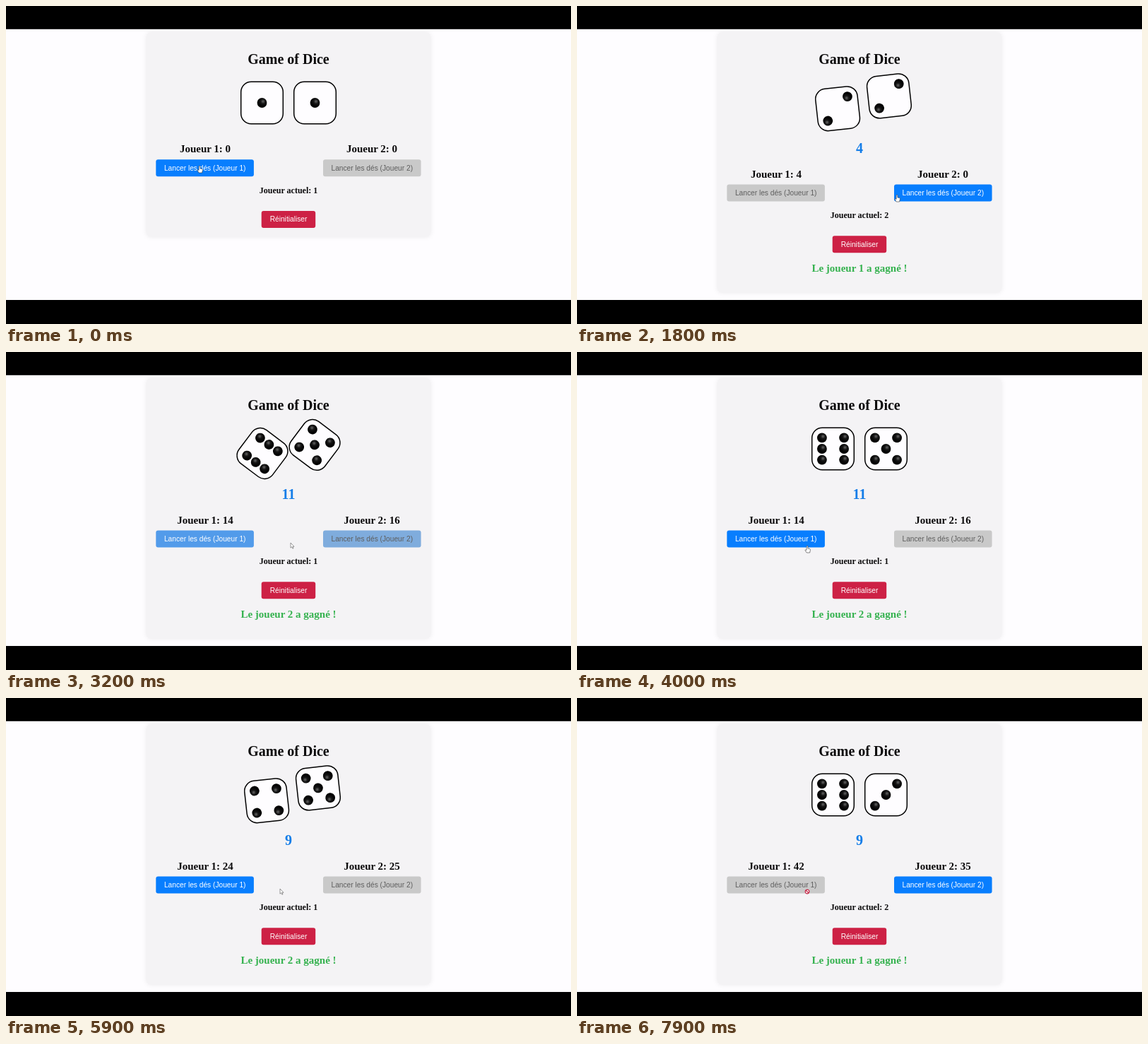
Animation, 800 px wide and 450 px high, one loop 8 s. Source, as an HTML page:

```html
<!DOCTYPE html>
<html lang="fr">
<head>
<meta charset="utf-8">
<title>Game of Dice</title>
<style>
  html, body { margin: 0; width: 100%; height: 100%; overflow: hidden; background: #000; }
  svg { display: block; width: 100%; height: 100%; }
  text { text-anchor: middle; font: bold 15px "Liberation Serif", "Times New Roman", serif; fill: #0b0a0b; }
  .big { font-size: 20px; }
  .turn { font-size: 12px; }
  .label { font: 10.2px "Liberation Sans", Arial, sans-serif; fill: #fff; }
  .panel { fill: #f4f3f5; filter: drop-shadow(0 0 3px rgba(0, 0, 0, .07)); }
  .face { fill: #fefdff; stroke: #000; stroke-width: 1.5; }
</style>
</head>
<body>
<svg viewBox="0 0 800 450">
  <defs>
    <radialGradient id="shine" cx=".6" cy=".36" r=".5">
      <stop offset="0" stop-color="#666"/>
      <stop offset=".45" stop-color="#161616"/>
      <stop offset="1" stop-color="#000"/>
    </radialGradient>
  </defs>
  <rect y="32.8" width="800" height="383.2" fill="#fefdff"/>
  <rect id="panel" class="panel" x="198.5" y="37" width="403" rx="7"/>
  <text class="big" x="400" y="82">Game of Dice</text>
  <text id="sum" class="big" x="400" y="208" style="fill:#147de8"></text>
  <g id="lower">
    <text id="score0" x="282" y="207.4"></text>
    <text id="score1" x="518" y="207.4"></text>
    <rect id="button0" x="212.3" y="217.2" width="138.6" height="24" rx="3"/>
    <rect id="button1" x="449" y="217.2" width="138.6" height="24" rx="3"/>
    <text id="label0" class="label" x="281.7" y="232.5">Lancer les dés (Joueur 1)</text>
    <text id="label1" class="label" x="518.3" y="232.5">Lancer les dés (Joueur 2)</text>
    <text id="turn" class="turn" x="400" y="264.7"></text>
    <rect x="361.7" y="290" width="76.5" height="24" rx="3" fill="#cd2145"/>
    <text class="label" x="400" y="305.3">Réinitialiser</text>
  </g>
  <text id="winner" x="400" y="376" style="fill:#35b24f"></text>
  <g id="dice">
    <g id="die0"></g>
    <g id="die1"></g>
  </g>
  <g id="cursor">
    <path id="arrow" d="M0 0V7.2L1.7 5.7L2.9 8.2L4 7.7L2.9 5.3H5Z" fill="#fff" stroke="#555" stroke-width=".6"/>
    <path id="hand" d="M-.9 .8Q0 -.6 .9 .8V4L3.7 4.6Q4.6 5 4.4 6.2L3.6 10H-.8L-3 6.6Q-3.2 5.2-.9 6.4Z" fill="#fff" stroke="#333" stroke-width=".6"/>
    <g id="blocked" fill="#fff" stroke="#c52848" stroke-width="1.2">
      <circle r="2.8"/><path d="M-2-2L2 2"/>
    </g>
  </g>
</svg>
<script>
const LOOP = 8000, FRAME = 100;
const ROLL = 195, UPDATE = 152, FADE = 100, GLIDE = 265;
const SHIFT = 35.3;
const BLUE = [8, 126, 254], GREY = [201, 201, 201];
const PIVOT = 402.8, DIE_X = [362.5, 437.5];
const ENTRY = [274, 226], HOMES = [[322, 274], [507, 264]];

// Players alternate; each pair of digits is one throw.
const throws = "22 32 46 65 64 54 63 55 63".split(" ").map(pair => [...pair].map(Number));
const starts = [310, 1710, 2428, 3010, 4510, 5210, 5810, 6402, 7410];

const el = id => document.getElementById(id);
const show = (id, on) => el(id).setAttribute("display", on ? "inline" : "none");
const move = (id, x, y, turn = 0) =>
  el(id).setAttribute("transform", `translate(${x} ${y}) rotate(${turn})`);
const mix = (a, b, k) => a + (b - a) * k;

function pips(n) {
  const spots = n % 2 ? [[0, 0]] : [];
  if (n > 1) spots.push([1, -1], [-1, 1]);
  if (n > 3) spots.push([-1, -1], [1, 1]);
  if (n === 6) spots.push([-1, 0], [1, 0]);
  return spots;
}

function drawDie(id, n) {
  if (el(id).dataset.n === String(n)) return;
  el(id).dataset.n = n;
  el(id).innerHTML = '<rect class="face" x="-29.8" y="-29.8" width="59.6" height="59.6" rx="14.5"/>' +
    pips(n).map(([x, y]) =>
      `<circle cx="${x * 15.6}" cy="${y * 15.6}" r="6.9" fill="url(#shine)"/>`).join("");
}

// After each throw the pointer glides towards the next player's button.
function cursorAt(t) {
  let pos = ENTRY;
  for (let i = 0; i < starts.length - 1 && t > starts[i]; i++) {
    const k = 1 - Math.exp((starts[i] - Math.min(t, starts[i + 1])) / GLIDE);
    const goal = HOMES[(i + 1) % 2];
    pos = pos.map((v, axis) => mix(v, goal[axis], k));
  }
  return pos.map(Math.round);
}

function drawCursor(t, shift, active) {
  const [x, y] = cursorAt(t);
  const inRow = y > 217 + shift && y < 241.2 + shift;
  const over = inRow && x > 212 && x < 351 ? 0 : inRow && x > 449 && x < 588 ? 1 : -1;
  move("cursor", x, y);
  show("arrow", over < 0);
  show("hand", over === active);
  show("blocked", over >= 0 && over !== active);
}

function drawRoll(t) {
  const start = starts.find(s => t >= s && t < s + ROLL);
  const k = start ? (t - start) / ROLL : 0;
  move("dice", PIVOT, 137, 360 * k);
  DIE_X.forEach((x, i) => move("die" + i, x - PIVOT, 0, 360 * k ** 5));
}

function draw(t) {
  const count = starts.filter(s => t >= s + UPDATE).length;
  const active = count % 2;
  const shift = count ? SHIFT : 0;
  const faces = count ? throws[count - 1] : [1, 1];
  const scores = [0, 0];
  throws.slice(0, count).forEach(([a, b], i) => scores[i % 2] += a + b);

  el("panel").setAttribute("height", count ? 369 : 290);
  move("lower", 0, shift);
  el("sum").textContent = count ? faces[0] + faces[1] : "";
  el("turn").textContent = `Joueur actuel: ${active + 1}`;
  el("winner").textContent = count ? `Le joueur ${2 - active} a gagné !` : "";

  const x = count ? Math.min(1, (t - starts[count - 1] - UPDATE) / FADE) : 1;
  const fade = 1 - (1 - x) ** 2;
  for (const p of [0, 1]) {
    const on = p === active;
    const blue = on ? fade : 1 - fade;
    el("score" + p).textContent = `Joueur ${p + 1}: ${scores[p]}`;
    el("button" + p).setAttribute("fill", `rgb(${GREY.map((g, i) => Math.round(mix(g, BLUE[i], blue)))})`);
    el("label" + p).style.fill = on ? "#fff" : "#5e5e5e";
    drawDie("die" + p, faces[p]);
  }

  drawRoll(t);
  drawCursor(t, shift, active);
}

const begin = performance.now();
function tick() {
  const t = (performance.now() - begin) % LOOP;
  draw(Math.floor(t / FRAME) * FRAME);
  requestAnimationFrame(tick);
}
tick();
</script>
</body>
</html>
```
